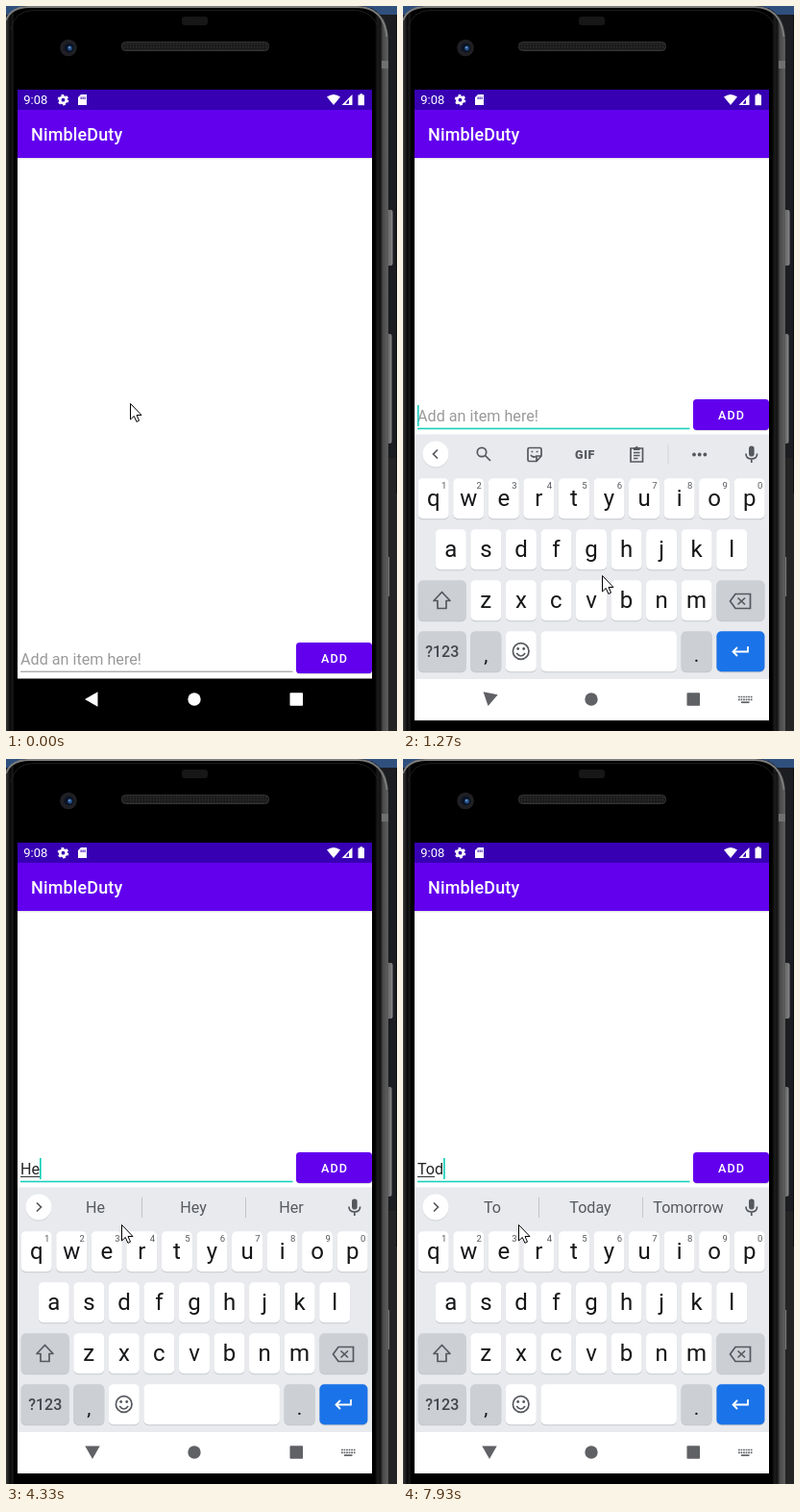
Animation, 407 px wide and 754 px high, one loop 8 s. Source, as an HTML page:

```html
<!DOCTYPE html>
<html lang="en">
<head>
<meta charset="utf-8">
<title>Todo app demo</title>
<style>
html, body { margin: 0; width: 100%; height: 100%; overflow: hidden; background: #1c1d20; }
svg { display: block; width: 407px; height: 754px; font-family: Roboto, "Noto Sans", sans-serif; }
text { white-space: pre; }
.mid { text-anchor: middle; }
.line { fill: none; stroke: #55585d; stroke-width: 1.7; }
.solid { fill: #55585d; }
</style>
</head>
<body>
<svg viewBox="0 0 407 754">
  <defs>
    <linearGradient id="rim" gradientUnits="userSpaceOnUse" x1="0" x2="400" y1="0" y2="0">
      <stop offset="0" stop-color="#3b3b3b"/>
      <stop offset=".006" stop-color="#202020"/>
      <stop offset=".012" stop-color="#070707"/>
      <stop offset=".016" stop-color="#1a1a1a"/>
      <stop offset=".022" stop-color="#000"/>
      <stop offset=".96" stop-color="#000"/>
      <stop offset=".967" stop-color="#1c1c1c"/>
      <stop offset=".974" stop-color="#141414"/>
      <stop offset=".981" stop-color="#4a4a4a"/>
      <stop offset=".992" stop-color="#5c5c5c"/>
      <stop offset="1" stop-color="#484848"/>
    </linearGradient>
    <linearGradient id="knob">
      <stop offset="0" stop-color="#8a8a8a"/>
      <stop offset=".5" stop-color="#6a6a6a"/>
      <stop offset="1" stop-color="#8c8c8c"/>
    </linearGradient>
    <linearGradient id="shade" x2="0" y2="1">
      <stop offset="0" stop-color="#000" stop-opacity=".12"/>
      <stop offset="1" stop-color="#000" stop-opacity="0"/>
    </linearGradient>
    <pattern id="mesh" width="3" height="3" patternUnits="userSpaceOnUse">
      <rect width="3" height="3" fill="#1b1b1b"/>
      <rect width="1.3" height="1.3" fill="#303030"/>
    </pattern>
    <clipPath id="screen"><rect x="12" y="87" width="369" height="656"/></clipPath>
  </defs>

  <!-- desktop and phone body -->
  <rect width="407" height="754" fill="#1c1d20"/>
  <rect width="407" height="9" fill="#2f4f7d"/>
  <rect x="397" y="470" width="10" height="284" fill="#242424"/>
  <rect x="406" y="9" width="1" height="498" fill="#0c0c0c"/>
  <rect x="396" y="212" width="6.500" height="58" rx="2" fill="url(#knob)"/>
  <rect x="396" y="341" width="5.500" height="114" rx="2" fill="url(#knob)"/>
  <rect x="397.500" y="573" width="1.600" height="41" fill="#777"/>
  <path d="M-2 760V26Q0 0 24 0H366Q397 0 398 36V760Z" fill="url(#rim)"/>
  <path d="M0 15Q5 1.200 24 1H366Q393 1 396.500 32" fill="none" stroke="#7d7d7d" stroke-width="1.800"/>
  <path d="M5 24Q9 5 28 4.500H362Q384 5 389 28" fill="none" stroke="#1d1d1d"/>
  <rect x="391" y="57" width="7" height="8" fill="#707070"/>
  <rect x="183" y="11" width="27" height="9" rx="3" fill="#171717"/>
  <rect x="120.500" y="37.500" width="153" height="9" rx="4" fill="url(#mesh)" stroke="#343434"/>
  <circle cx="65" cy="43.500" r="8.800" fill="#202024"/>
  <circle cx="65.500" cy="43.500" r="5" fill="#0b1324"/>
  <circle cx="66.500" cy="44" r="2.400" fill="#28558f"/>
  <circle cx="66" cy="43" r=".9" fill="#7aa6d8"/>

  <!-- app -->
  <rect x="12" y="87" width="369" height="612.500" fill="#fff"/>
  <rect x="12" y="158" width="369" height="2" fill="url(#shade)"/>
  <rect x="12" y="87" width="369" height="21" fill="#3700b3"/>
  <rect x="12" y="108" width="369" height="50" fill="#6200ee"/>
  <g fill="#fff">
    <text x="18.300" y="102.300" font-size="13">9:08</text>
    <circle cx="59.500" cy="97.700" r="3.200" fill="none" stroke="#fff" stroke-width="2.600"/>
    <circle cx="59.500" cy="97.700" r="4.900" fill="none" stroke="#fff" stroke-width="1.800" stroke-dasharray="2.7 2.43"/>
    <path d="M78 92H84V103H75V95ZM77.600 94.500V97H78.600V94.500ZM79.600 94.500V97H80.600V94.500ZM81.600 94.500V97H82.600V94.500Z" fill-rule="evenodd"/>
    <path d="M334 94.500Q341 89.500 348 94.500L341 103Z"/>
    <path d="M360.500 92V103H349.500Z"/>
    <path d="M357 97V101.800H353.500Z" fill="#3700b3"/>
    <path d="M366.500 92.500H368.400V91.300H371.200V92.500H373V103.300H366.500Z"/>
    <text x="26" y="140" font-size="18" font-weight="500" letter-spacing=".13">NimbleDuty</text>
  </g>

  <g id="form">
    <text id="field" x="15" y="685.400" font-size="16.160"></text>
    <rect id="compose" x="15" y="687" height="1" fill="#333"/>
    <rect id="base" x="15" width="283.500"/>
    <rect id="caret" y="668" width="1.700" height="22" fill="#19cfba"/>
    <rect x="302.500" y="663" width="78.500" height="32" rx="4" fill="#000" opacity=".15"/>
    <rect x="302" y="662" width="79" height="32" rx="3.600" fill="#6200ee"/>
    <text class="mid" x="342" y="683" font-size="12.570" font-weight="500" letter-spacing="1.120" fill="#fff">ADD</text>
  </g>

  <!-- keyboard -->
  <g clip-path="url(#screen)">
    <g id="board">
      <rect x="12" y="445.500" width="369" height="300" fill="#e8eaee"/>
      <circle cx="34" cy="467" r="13.500" fill="#000" opacity=".1"/>
      <circle cx="34" cy="466" r="13.500" fill="#fff"/>
      <path id="chevron" class="line" d="M36 461.500L31.500 466L36 470.500"/>
      <g id="tools">
        <circle class="line" cx="82" cy="464" r="4.700"/>
        <path class="line" d="M85.500 467.500L91 473" stroke-width="2"/>
        <path class="line" d="M131.500 459.500H142.500Q144 459.500 144 461V468L139 473.500H131.500Q130 473.500 130 472V461Q130 459.500 131.500 459.500ZM144 468H139V473.500M133 467Q135 470 138 468.500"/>
        <path class="line" d="M133.500 463.500H135.300M138.700 463.500H140.500"/>
        <text class="mid solid" x="189.500" y="470.500" font-size="12.500" font-weight="900" letter-spacing=".6">GIF</text>
        <path class="line" d="M237 460H249.500V474H237ZM240 464.500H246.500M240 467.500H246.500M240 470.500H244.500"/>
        <path class="solid" d="M240 459H242Q243.200 456.500 244.500 459H246.500V462H240Z"/>
        <path d="M276 456V477" stroke="#d3d5d9"/>
        <g class="solid"><circle cx="303" cy="466.500" r="1.900"/><circle cx="308.700" cy="466.500" r="1.900"/><circle cx="314.400" cy="466.500" r="1.900"/></g>
      </g>
      <g id="hints" font-size="16.100" fill="#56595d">
        <path d="M141.500 456V477M249.500 456V477" stroke="#c3c5c9"/>
        <text class="mid" x="93" y="472.300"></text>
        <text class="mid" x="195" y="472.300"></text>
        <text class="mid" x="297" y="472.300"></text>
      </g>
      <rect class="solid" x="360" y="457.500" width="5.600" height="11" rx="2.800"/>
      <path class="line" d="M357 465.500Q357 471 362.800 471Q368.600 471 368.600 465.500M362.800 471V475"/>
      <g id="keys"></g>
      <path class="line" d="M40.500 609.500L49 618.500H45V626.500H36V618.500H32Z" stroke-linejoin="round"/>
      <path class="line" d="M346 611.500H361.500V626.500H346L340.500 619ZM348.500 615.500L356 622.500M356 615.500L348.500 622.500"/>
      <circle class="line" cx="122.700" cy="671" r="8.300"/>
      <path class="line" d="M118.200 673Q122.700 679 127.200 673"/>
      <g class="solid"><circle cx="119.700" cy="668.500" r="1.400"/><circle cx="125.700" cy="668.500" r="1.400"/></g>
      <path d="M359 666V671.500H344M348 667L343.500 671.500L348 676" fill="none" stroke="#fff" stroke-width="1.800"/>
    </g>
    <rect id="bar" x="12" y="700" width="369" height="43" fill="#fff"/>
  </g>
  <g id="nav">
    <path id="back" d="M82 721L95.500 713.300V728.700Z"/>
    <circle cx="196" cy="721" r="6.700"/>
    <rect x="295.500" y="714.300" width="13.500" height="13.500" rx=".8"/>
    <g id="switch">
      <path d="M349 718.500H363.500M349 721.300H363.500" fill="none" stroke-width="1.700" stroke-dasharray="1.7 .86"/>
      <path d="M352 724.200H360.500" fill="none" stroke-width="1.700"/>
    </g>
  </g>
  <path id="mouse" d="M.5 .5V17L4.300 13.500L6.900 19.400L9.500 18.200L7 12.500H12Z" fill="#fff" stroke="#000" stroke-linejoin="round"/>
</svg>
<script>
const $ = id => document.getElementById(id);
const LOOP = 8000, STEP = 200 / 3;

function key(x, y, w, label = '', o = {}) {
  const box = (dy, fill) =>
    `<rect x="${x}" y="${y + dy}" width="${w}" height="42" rx="5" fill="${fill}"/>`;
  const size = o.size || 24;
  let s = box(1, '#c3c5ca') + box(0, o.fill || '#fff');
  s += `<text class="mid" x="${x + w / 2}" y="${y + (o.drop || 28.7)}" font-size="${size}"
    font-weight="${o.weight || 400}" fill="${o.ink || '#151618'}">${label}</text>`;
  if (o.digit) s += `<text class="mid" x="${x + 27}" y="${y + 11}" font-size="9.5" fill="#55585d">${o.digit}</text>`;
  return s;
}

function buildKeys() {
  const pitch = 36.55, w = 32, gray = '#cccfd4';
  const row = (letters, x, y, digits) => [...letters]
    .map((c, i) => key(x + i * pitch, y, w, c, { digit: digits && digits[i] })).join('');
  $('keys').innerHTML =
    row('qwertyuiop', 15.7, 491.3, '1234567890') +
    row('asdfghjkl', 33.8, 544.2) +
    key(15.7, 597.3, 50, '', { fill: gray }) +
    row('zxcvbnm', 70.3, 597.3) +
    key(326.4, 597.3, 50, '', { fill: gray }) +
    key(15.7, 650.2, 50, '?123', { fill: gray, size: 16, weight: 500, drop: 27, ink: '#43464a' }) +
    key(70.3, 650.2, w, ',', { fill: gray, size: 21, drop: 32 }) +
    key(106.8, 650.2, w) +
    key(143.4, 650.2, 141.5) +
    key(289.6, 650.2, w, '.', { fill: gray, size: 21, drop: 32 }) +
    key(326.4, 650.2, 50, '', { fill: '#1a73e8' });
}
buildKeys();

const S = {
  none: '', he: 'He|Hey|Her', hel: 'Hel|Hello|Help', hell: 'Hell|Hello|Hells',
  hello: "Hello|Hellos|Hello's", li: 'Li|Like|Little', lis: 'Lis|List|Lists',
  list: 'List|Lists|Listen', next: 'for|of|to', to: 'To|Today|Tomorrow'
};

// time, text, underlined letters, suggestions, caret hidden
const typing = [
  [0, '', 0, S.none], [1470, '', 0, S.none, 1],
  [1670, 'H', 0, S.none], [1870, 'He', 1, S.none], [1930, 'He', 2, S.he],
  [2070, 'Hel', 2, S.he], [2130, 'Hel', 3, S.hel], [2200, 'Hell', 3, S.hel],
  [2270, 'Hello', 4, S.hell], [2470, 'Hello', 5, S.hello],
  [2930, 'Hello', 5, S.hello, 1], [3400, 'Hello', 5, S.hello],
  [3800, 'Hell', 4, S.hello], [3870, 'Hell', 4, S.hell],
  [4000, 'Hel', 3, S.hell], [4070, 'Hel', 3, S.hel],
  [4270, 'He', 2, S.hel], [4330, 'He', 2, S.he], [4400, 'H', 1, S.he],
  [4470, '', 0, S.none], [4870, 'L', 0, S.none],
  [5070, 'Li', 1, S.none], [5130, 'Li', 2, S.li], [5200, 'Lis', 2, S.li],
  [5270, 'Lis', 3, S.lis], [5470, 'List ', 4, S.list], [5730, 'List ', 0, S.next],
  [6200, 'List ', 0, S.next, 1], [6530, 'List', 0, S.next], [6600, 'List', 4, S.list],
  [6670, 'Lis', 3, S.list], [6730, 'Lis', 3, S.lis], [6800, 'Li', 2, S.lis],
  [6870, 'Li', 2, S.li], [6930, 'L', 1, S.li], [7000, '', 0, S.none],
  [7470, '', 0, S.none, 1], [7670, 'T', 0, S.none],
  [7870, 'To', 2, S.to], [7930, 'Tod', 2, S.to]
];

// time, x, y
const path = [
  [0, 129, 413], [133, 133, 386], [266, 139, 362], [400, 145, 430], [533, 150, 565],
  [666, 150, 662], [733, 149, 676], [866, 149, 671], [1067, 149, 671],
  [1200, 186, 622], [1266, 207, 592], [3067, 207, 592], [3200, 178, 560],
  [3333, 138, 508], [3466, 120, 484]
];

const slide = [[1067, 300], [1133, 140], [1200, 36], [1266, 0]];
const turn = [[1067, 0], [1133, -25], [1200, -54], [1266, -79], [1333, -90]];

function at(points, t, i = 1) {
  const n = points.findIndex(p => p[0] > t);
  if (n === 0) return points[0][i];
  if (n < 0) return points[points.length - 1][i];
  const a = points[n - 1], b = points[n];
  return a[i] + (b[i] - a[i]) * (t - a[0]) / (b[0] - a[0]);
}

const pen = document.createElement('canvas').getContext('2d');
pen.font = '16.16px Roboto, "Noto Sans", sans-serif';
const width = s => pen.measureText(s).width;

function set(id, attrs) {
  for (const k in attrs) $(id).setAttribute(k, attrs[k]);
}
function show(id, on) { $(id).style.display = on ? '' : 'none'; }

function draw(t) {
  const q = Math.floor((t + 3.4) / STEP) * STEP + .4;
  const [, text, marked, words, hidden] = typing.filter(s => s[0] <= t).pop();
  const focus = t >= 870, raised = t >= 1000, open = t >= 1130;

  set('form', { transform: `translate(0 ${raised ? -253 : 0})` });
  $('field').textContent = text || 'Add an item here!';
  set('field', { fill: text ? '#252525' : '#9a9a9a' });
  set('compose', { width: width(text.slice(0, marked)) });
  set('base', focus
    ? { y: 691.7, height: 1.6, fill: '#19cfba' }
    : { y: 691.7, height: 1, fill: '#8c8c8c' });
  set('caret', { x: 14.9 + width(text) });
  show('caret', focus && !hidden);

  show('board', open);
  set('board', { transform: `translate(0 ${at(slide, q)})` });
  show('tools', !words);
  show('hints', words);
  set('chevron', { transform: words ? 'rotate(180 34 466)' : '' });
  const parts = words.split('|');
  $('hints').querySelectorAll('text').forEach((el, i) => el.textContent = parts[i] || '');

  const ink = open ? '#5f6165' : '#fff';
  show('bar', open);
  set('nav', { fill: ink });
  set('switch', { stroke: ink });
  show('switch', raised);
  set('back', { transform: `rotate(${at(turn, q)} 89.500 720.500)` });
  const [x, y] = [1, 2].map(i => Math.round(at(path, q, i)));
  set('mouse', { transform: `translate(${x} ${y})` });
}

let start;
function tick(now) {
  if (start === undefined) start = now;
  draw((now - start) % LOOP);
  requestAnimationFrame(tick);
}
draw(0);
requestAnimationFrame(tick);
</script>
</body>
</html>
```
